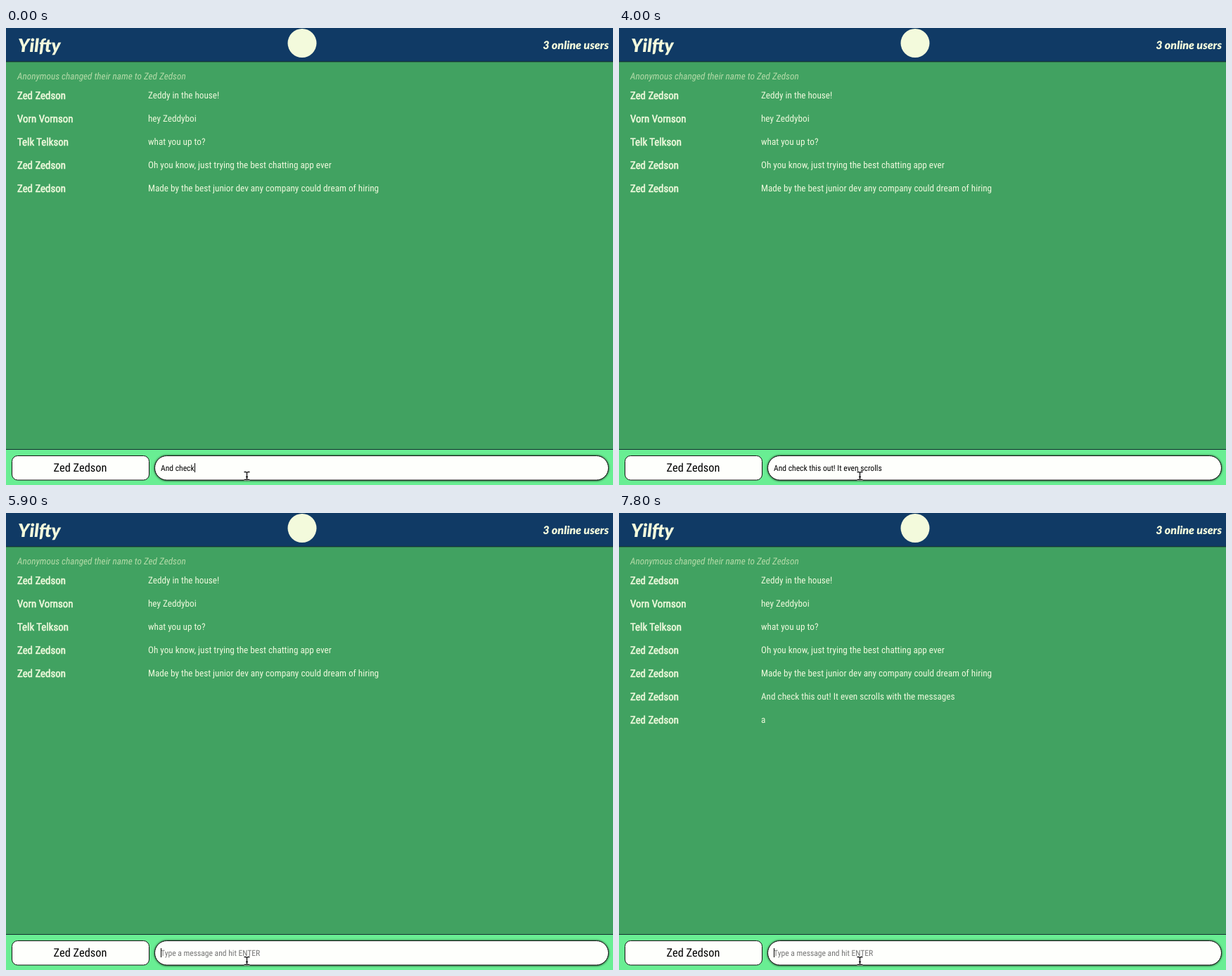
Animation, 863 px wide and 649 px high, one loop 8 s. Source, as an HTML page:

```html
<!DOCTYPE html>
<html lang="en">
<head>
<meta charset="utf-8">
<title>Chat room</title>
<style>
  html, body { margin: 0; width: 100%; height: 100%; overflow: hidden; background: #41a261; }
  svg { display: block; }
  text {
    font-family: "Roboto Condensed", Roboto, sans-serif;
    font-stretch: 75%;
    white-space: pre;
    text-rendering: geometricPrecision;
  }
  .script { font-family: Lato, sans-serif; font-style: italic; font-weight: 900; fill: #f3fadc; }
  .notice { font-size: 13.3px; font-style: italic; fill: #b4dba8; }
  .name { font-size: 14.9px; fill: #eef9dc; stroke: #eef9dc; stroke-width: .55px; }
  .message { font-size: 13.2px; fill: #eef9dc; }
  .draft { font-size: 11.6px; }
  .field { fill: #fefffc; stroke: #111; }
  .pointer { fill: none; stroke: #111; stroke-width: 1.3px; }
  .pointer.halo { stroke: #fff; stroke-width: 2.6px; }
</style>
</head>
<body>
<svg width="863" height="649" viewBox="0 0 863 649">
  <defs>
    <filter id="glow" x="-5%" y="-50%" width="110%" height="200%">
      <feGaussianBlur stdDeviation="1.7"/>
    </filter>
    <path id="beam" d="M338.5 630.5h2.5l1.5 1 1.5-1h2.5M342.5 631.5v9M338.5 641.5h2.5l1.5-1 1.5 1h2.5M341 637.5h3"/>
  </defs>

  <rect width="863" height="649" fill="#41a261"/>
  <rect width="863" height="47.6" fill="#103a65"/>
  <rect y="47.4" width="863" height=".9" fill="#0a1a24"/>
  <text class="script" x="17" y="34" font-size="26">Yilfty</text>
  <circle cx="421" cy="21.5" r="20.5" fill="#f3fadc"/>
  <text class="script" x="857" y="29.5" font-size="16" text-anchor="end">3 online users</text>

  <text class="notice" x="16" y="72.5">Anonymous changed their name to Zed Zedson</text>
  <g id="rows"></g>

  <rect y="598" width="863" height="51" fill="#69ee93"/>
  <rect y="598" width="863" height=".9" fill="#0a1a24"/>
  <rect class="field" x="8.5" y="607.5" width="195" height="34.5" rx="8"/>
  <text x="105.5" y="630" font-size="16.4" text-anchor="middle">Zed Zedson</text>
  <rect x="211" y="607" width="646" height="36" rx="18" opacity=".8" filter="url(#glow)"/>
  <rect class="field" x="211.5" y="607.5" width="645" height="34.5" rx="17.2"/>
  <text id="draft" class="draft" x="220" y="628.6"></text>
  <rect id="caret" y="618" width="1" height="13"/>

  <use class="pointer halo" href="#beam"/>
  <use class="pointer" href="#beam"/>
</svg>

<script>
const LOOP = 8000;
const TICK = 100;
const BLINK = 600;
const PLACEHOLDER = "Type a message and hit ENTER";
const SENTENCE = "And check this out! It even scrolls with the messages";

// Typing pace: [time, characters typed], linear in between
const pace = [
  [0, 9], [400, 15], [1400, 21], [2900, 33], [3400, 34.8],
  [4190, 35.2], [4300, 36.4], [5000, 46], [5200, 46.5], [5700, 53]
];
const SENT_AT = 5900;

const me = "Zed Zedson";
// [appears at, name, message]
const log = [
  [0, me, "Zeddy in the house!"],
  [0, "Vorn Vornson", "hey Zeddyboi"],
  [0, "Telk Telkson", "what you up to?"],
  [0, me, "Oh you know, just trying the best chatting app ever"],
  [0, me, "Made by the best junior dev any company could dream of hiring"],
  [6300, me, SENTENCE],
  [7800, me, "a"]
];

const byId = id => document.getElementById(id);
const draft = byId("draft");
const caret = byId("caret");
const show = (node, visible) => node.style.visibility = visible ? "visible" : "hidden";

function addSvg(parent, tag, attributes, content = "") {
  const node = document.createElementNS("http://www.w3.org/2000/svg", tag);
  for (const key in attributes) node.setAttribute(key, attributes[key]);
  node.textContent = content;
  return parent.appendChild(node);
}

const rows = log.map(([, name, message], i) => {
  const row = addSvg(byId("rows"), "g", { transform: `translate(0 ${100 + 33 * i})` });
  addSvg(row, "text", { class: "name", x: 16, y: 0.8 }, name);
  addSvg(row, "text", { class: "message", x: 202, y: 0 }, message);
  return row;
});

function interpolate(points, t) {
  const next = points.findIndex(([time]) => time > t);
  if (next < 0) return points[points.length - 1][1];
  const [t0, v0] = points[next - 1];
  const [t1, v1] = points[next];
  return v0 + (v1 - v0) * (t - t0) / (t1 - t0);
}

function draftAt(t) {
  if (t < SENT_AT) return SENTENCE.slice(0, Math.round(interpolate(pace, t)));
  return t >= 7500 && t < 7600 ? "a" : "";
}

// Time since the draft last changed
function idleAt(t) {
  let idle = 0;
  while (idle < t && draftAt(t - idle - TICK) === draftAt(t)) idle += TICK;
  return idle;
}

function render(time) {
  const t = Math.floor(time / TICK) * TICK;
  const typed = draftAt(t);
  draft.textContent = typed || PLACEHOLDER;
  draft.setAttribute("fill", typed ? "#000" : "#757575");
  const width = typed ? draft.getComputedTextLength() : 0;
  caret.setAttribute("x", Math.round(220 + width));
  show(caret, Math.floor(idleAt(t) / BLINK) % 2 === 0);
  rows.forEach((row, i) => show(row, t >= log[i][0]));
}

const start = performance.now();
function tick() {
  render((performance.now() - start) % LOOP);
  requestAnimationFrame(tick);
}
tick();
</script>
</body>
</html>
```
